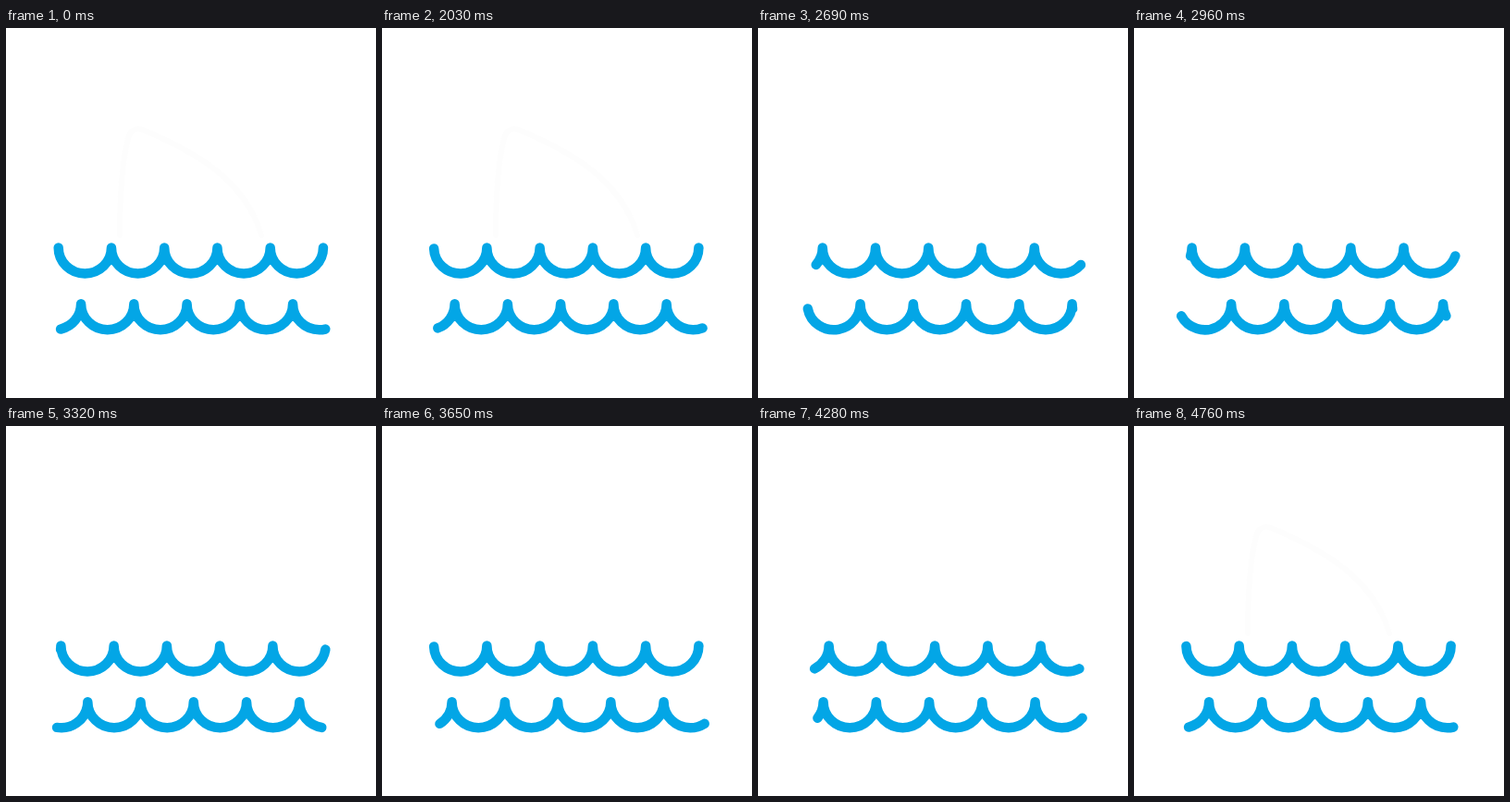
Animation of 400x400 px, one loop 4.79 s. Source, as an HTML page with a canvas:

```html
<!DOCTYPE html>
<html lang="en">
<head>
<meta charset="utf-8">
<title>Waves</title>
<style>
html, body { margin: 0; width: 100%; height: 100%; overflow: hidden; background: #fff; }
canvas { display: block; }
</style>
</head>
<body>
<canvas id="stage" width="400" height="400"></canvas>
<script>
const ctx = document.getElementById('stage').getContext('2d');
const LOOP = 4790, HOLD = 2030, STEP = 30;
const WIDTH = 57.25, DEPTH = 28, CRESTS = 5;

// Distance travelled, in wave lengths, as [ms, value] keys
const upperKeys = [[2000, 0], [2030, 0.01], [2450, 0.591], [2960, 0.897], [3650, 1.01], [4280, 1.652], [4760, 2.005]];
const lowerKeys = [[2000, 0.574], [2030, 0.617], [2450, 0.97], [2960, 1.154], [3650, 1.67], [4280, 1.757], [4760, 1.574]];

// Smooth interpolation that never overshoots its keys
function ease(keys, t) {
  const last = keys.length - 1;
  const secant = i => (keys[i + 1][1] - keys[i][1]) / (keys[i + 1][0] - keys[i][0]);
  const slope = i => {
    if (i === 0) return secant(0);
    if (i === last) return 0;
    const a = secant(i - 1), b = secant(i);
    return a * b > 0 ? 2 * a * b / (a + b) : 0;
  };
  let i = 0;
  while (i < last - 1 && t >= keys[i + 1][0]) i++;
  const [t0, v0] = keys[i], [t1, v1] = keys[i + 1];
  const d = t1 - t0, u = (t - t0) / d, w = 1 - u;
  return v0 * w * w * (1 + 2 * u) + v1 * u * u * (3 - 2 * u)
    + d * u * w * (slope(i) * w - slope(i + 1) * u);
}

// The curve slides left by shift while the visible stretch begins at start
function wave(y, shift, start) {
  const end = start + CRESTS;
  ctx.beginPath();
  for (let n = Math.floor(start); n < end; n++) {
    const from = Math.max(start - n, 0), to = Math.min(end - n, 1);
    const x = 56.7 + WIDTH * (n - shift + 0.5);
    ctx.ellipse(x, y, WIDTH / 2, DEPTH, 0, Math.PI * (1 - from), Math.PI * (1 - to), true);
  }
  ctx.strokeStyle = '#03a6e6';
  ctx.lineWidth = 10.5;
  ctx.stroke();
}

function fin() {
  ctx.beginPath();
  ctx.moveTo(123, 224);
  ctx.bezierCurveTo(123, 175, 126, 140, 133, 116);
  ctx.quadraticCurveTo(137, 107, 148, 110);
  ctx.bezierCurveTo(200, 132, 258, 162, 276, 224);
  ctx.strokeStyle = '#fdfdfd';
  ctx.lineWidth = 6;
  ctx.stroke();
}

function draw(now) {
  const time = now % LOOP;
  const t = time < HOLD ? 2000 : Math.min(2000 + Math.floor((time - 2000) / STEP) * STEP, 4760);
  ctx.fillStyle = '#fff';
  ctx.fillRect(0, 0, 400, 400);
  ctx.lineCap = ctx.lineJoin = 'round';
  if (t <= HOLD || t >= 4730) fin();

  const upper = ease(upperKeys, t), lower = ease(lowerKeys, t);
  const late = Math.min(Math.max((t - 3500) / 1240, 0), 1);
  wave(237.5, upper, upper);
  wave(298.3, lower, lower + 0.032 * Math.sin(Math.PI * late));
}

const begin = performance.now();
function tick() {
  draw(performance.now() - begin);
  requestAnimationFrame(tick);
}
tick();
</script>
</body>
</html>
```
